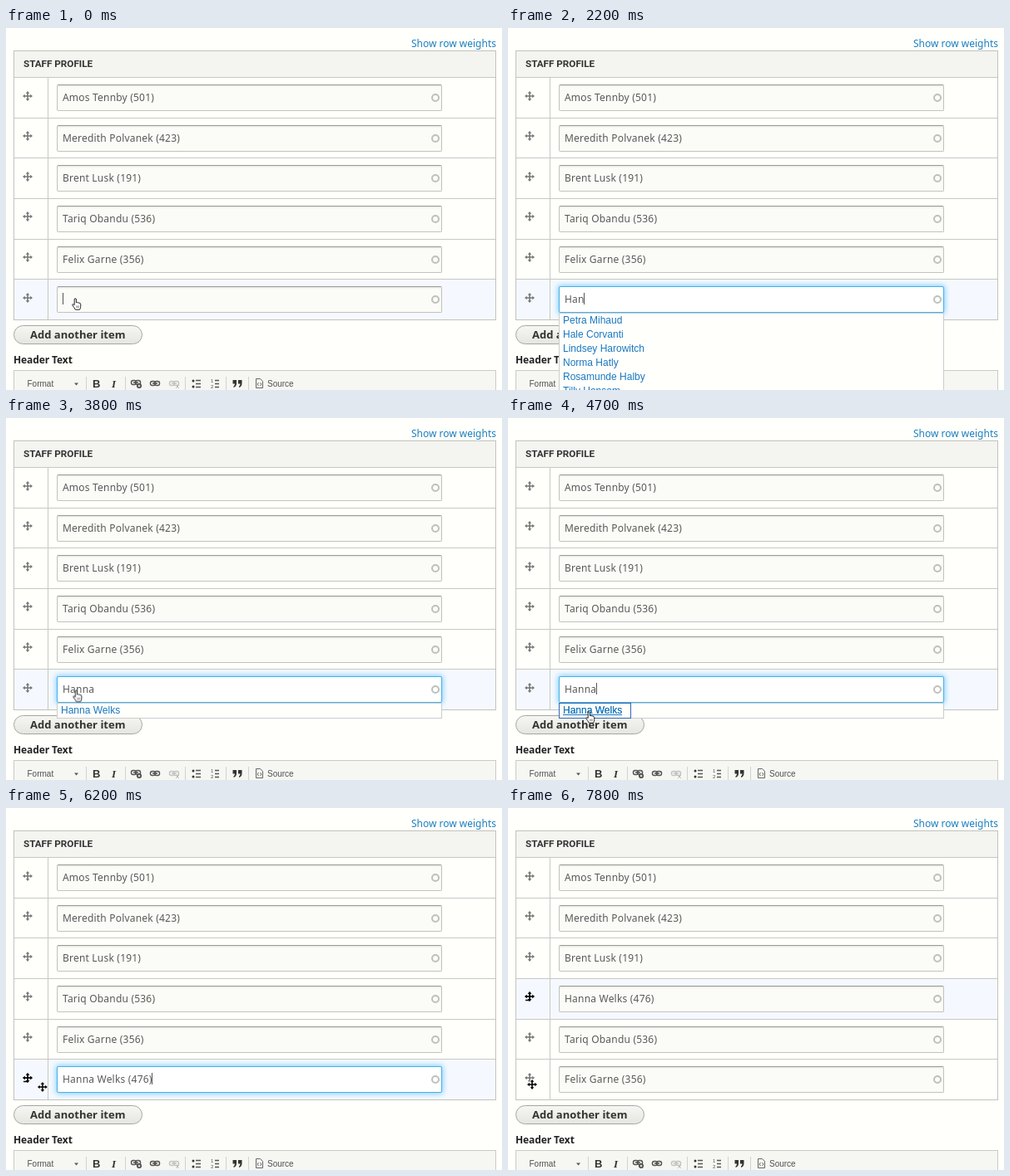
An HTML page that plays this animation: 596 px wide and 436 px high, repeating every 8000 ms.

```html
<!DOCTYPE html>
<html lang="en">
<head>
<meta charset="utf-8">
<title>Staff profile form</title>
<style>
html, body { margin: 0; width: 100%; height: 100%; overflow: hidden; }
body { position: relative; background: #fffffc; font: 12px "Noto Sans", "Open Sans", sans-serif; color: #595959; }
#stage { position: absolute; left: 0; top: 0; width: 596px; height: 436px; overflow: hidden; }
#stage div, #stage svg, #stage ul { position: absolute; box-sizing: border-box; }
#stage div { white-space: pre; }
.link { right: 7px; top: 10px; line-height: 17px; color: #1a7fc0; }

.table { left: 9px; top: 27px; width: 580px; height: 325px; border: 1px solid #c2c2bd; }
.head { left: 9px; top: 27px; width: 580px; height: 32px; padding-left: 11px; border: 1px solid #c2c2bd; border-bottom: 0;
  background: #f4f4f1; font: bold 11.7px/31px Roboto, sans-serif; color: #333; }
.row { left: 10px; top: var(--y); width: 578px; height: 48.65px; border-top: 1px solid #c8c8c3; background: #fffffc; }
.row::before { content: ""; position: absolute; left: 40px; top: 0; bottom: 0; border-left: 1px solid #c8c8c3; }
.row.active { background: #f5f9ff; z-index: 1; }
.grip { left: 9.5px; top: 15.5px; width: 12px; height: 12px; fill: #777; }
.grip.hot { fill: #000; }
.input, .glow { left: 51px; top: 8px; width: 463px; height: 32px; border: 1px solid #c3c3be; border-radius: 2px; }
.input { border-top-color: #9a9a97; background: #fbfbf8; box-shadow: inset 0 1px 2px rgba(0,0,0,.1); }
.glow { border-color: #45b2ec; background: #fff; box-shadow: 0 0 6px 1px #7fcdf8; }
.text { left: 58px; top: 8px; line-height: 32px; letter-spacing: .2px; }
.ring { left: 501px; top: 19px; width: 10px; height: 10px; border: 2px solid #bfbfbc; border-radius: 50%; }
.busy { left: 500px; top: 18px; width: 12px; height: 12px; }
.caret { display: inline-block; width: 1px; height: 14px; margin-left: -.2px; vertical-align: -2px; background: #555; }

.button { left: 9px; top: 358px; width: 155px; height: 23px; border: 1px solid #a5a5a2; border-radius: 12px; padding-left: 19px;
  background: linear-gradient(#f6f6f2, #e6e6e1); font-weight: bold; font-size: 13px; line-height: 21px; color: #333; }
.label { left: 9px; top: 391px; line-height: 17px; font-weight: bold; letter-spacing: -.1px; color: #222; }
.bar { left: 9px; top: 412px; width: 580px; height: 40px; border: 1px solid #cacac6; background: #f6f6f3; }
.bar svg { left: -1px; top: -1px; }
.bar text { font: 10px "Liberation Sans", Arial, sans-serif; fill: #505050; }

.menu { left: 61px; top: 343px; width: 463px; margin: 0; padding: 0 0 0 4px; list-style: none; border: 1px solid #ccc; z-index: 2;
  background: #fffffc; font: 12px/17px "Liberation Sans", Arial, sans-serif; color: #1a78c0; }
.menu.tall { height: 120px; }
.menu.one { height: 19px; }
.pick { left: -1px; top: -1px; width: 87px; height: 19px; padding-left: 5px; border: 1px solid #3566b0; text-decoration: underline; }
.pick { padding-left: 4px; }

.cursor { left: 0; top: 0; z-index: 3; }
.hand { left: -6px; top: -7px; width: 12px; height: 15px; }
.move { left: -6px; top: -6px; width: 12px; height: 12px; }

.row.active, .drop4, .drop3, .glow, .caret, .hot, .under, .busy, .menu, .pick, .hand, .move {
  animation: 8s step-end infinite; }
.row.active { animation-name: lift; }
.drop4 { animation-name: drop4; }
.drop3 { animation-name: drop3; }
.glow { animation-name: glow; animation-timing-function: linear; }
.caret { animation-name: blink; }
.hot { animation-name: hot; }
.under { animation-name: under; }
.busy { animation-name: busy; }
.m1 { animation-name: m1; }
.m2 { animation-name: m2; }
.m3 { animation-name: m3; }
.pick { animation-name: pick; }
.cursor { animation: travel 8s linear infinite; }
.hand { animation-name: hand; }
.move { animation-name: move; }

@keyframes lift { 0% { top: var(--y); } 92.5% { top: calc(var(--y) - 48.65px); } 93.75%, 100% { top: calc(var(--y) - 97.3px); } }
@keyframes drop4 { 0% { top: var(--y); } 92.5%, 100% { top: calc(var(--y) + 48.65px); } }
@keyframes drop3 { 0% { top: var(--y); } 93.75%, 100% { top: calc(var(--y) + 48.65px); } }
@keyframes glow { 0%, 2.4% { opacity: 0; } 6%, 92.49% { opacity: 1; } 92.5%, 100% { opacity: 0; } }
@keyframes blink { 0%, 12.5%, 52.5%, 75%, 87.5% { opacity: 1; } 6.25%, 46.25%, 68.75%, 81.25%, 92.5%, 100% { opacity: 0; } }
@keyframes hot { 0% { opacity: 0; } 77.5%, 100% { opacity: 1; } }
@keyframes under { 0%, 90% { opacity: 0; } 77.5%, 97.5%, 100% { opacity: 1; } }
@keyframes busy { 0%, 25%, 32.5%, 40%, 100% { opacity: 0; } 23.75%, 28.75%, 36.25% { opacity: 1; } }
@keyframes m1 { 0%, 32.5%, 100% { opacity: 0; } 25% { opacity: 1; } }
@keyframes m2 { 0%, 40%, 100% { opacity: 0; } 32.5% { opacity: 1; } }
@keyframes m3 { 0%, 60%, 100% { opacity: 0; } 40% { opacity: 1; } }
@keyframes pick { 0% { opacity: 0; } 51.25%, 100% { opacity: 1; } }
@keyframes hand { 0%, 46.25% { opacity: 1; } 13.1%, 76.25%, 100% { opacity: 0; } }
@keyframes move { 0% { opacity: 0; } 76.25%, 100% { opacity: 1; } }
@keyframes travel {
  0%, 46.25% { transform: translate(85px, 332px); animation-timing-function: ease-in-out; }
  52.5%, 67.5% { transform: translate(99px, 360px); }
  68.75%, 72.5% { transform: translate(100px, 356px); }
  77.5% { transform: translate(44px, 336px); }
  78.75%, 100% { transform: translate(29px, 333px); }
}
</style>
</head>
<body>
<svg width="0" height="0" style="position:absolute">
  <defs>
    <path id="cross" d="M6 0 8.3 2.8H6.8V5.2H9.2V3.7L12 6 9.2 8.3V6.8H6.8V9.2H8.3L6 12 3.7 9.2H5.2V6.8H2.8V8.3L0 6 2.8 3.7V5.2H5.2V2.8H3.7Z"/>
    <g id="chain" fill="none" stroke-width="1.5">
      <rect x="-5.5" y="-2.5" width="6" height="5" rx="2.3"/><rect x="-.5" y="-2.5" width="6" height="5" rx="2.3"/><path d="M-3 0H3"/>
    </g>
  </defs>
</svg>
<div id="stage">
  <div class="link">Show row weights</div>
  <div class="table"></div>
  <div class="head">STAFF PROFILE</div>
  <div id="rows"></div>
  <div class="button">Add another item</div>
  <div class="label">Header Text</div>
  <div class="bar">
    <svg width="580" height="40" viewBox="9 412 580 40">
      <text x="25.5" y="432">Format</text>
      <path d="M82 427.5h5l-2.500 3z" fill="#555"/>
      <path d="M96.500 420v18M143.500 420v18M215.500 420v18M264.500 420v18M291.500 420v18" stroke="#d2d2ce"/>
      <text x="104" y="433" style="font-weight:bold;font-size:13px;fill:#333">B</text>
      <text x="127" y="433" style="font:italic bold 13px 'Liberation Serif',serif;fill:#333">I</text>
      <g stroke="#555">
        <use href="#chain" x="156" y="427"/><use href="#chain" x="179" y="428"/>
        <use href="#chain" x="202" y="428" opacity=".3"/>
      </g>
      <circle cx="160" cy="431" r="3" fill="#444"/><path d="M158.500 431h3M160 429.500v3" stroke="#fff"/>
      <path d="M204 430l4 4m0-4l-4 4" stroke="#bbb"/>
      <path d="M228 424.500h6M228 428.500h6M228 432.500h6M251 424.500h5M251 428.500h5M251 432.500h5" stroke="#555" stroke-width="1.3"/>
      <g fill="#333"><circle cx="225" cy="425" r="1.500"/><circle cx="225" cy="432" r="1.500"/></g>
      <text x="246" y="427" style="font-size:6px">1</text><text x="246" y="434" style="font-size:6px">2</text>
      <path id="quote" d="M272.500 424h4.500v4q0 4-3.500 5v-1.500q1.500-1 1.500-3h-2.500z" fill="#333"/>
      <use href="#quote" x="6.500"/>
      <path d="M300.500 422.500h5l3 3v8h-8zM303.500 427l-1.500 2 1.500 2M305.500 427l1.500 2-1.500 2" fill="none" stroke="#666"/>
      <text x="314" y="432">Source</text>
    </svg>
  </div>
  <ul class="menu tall m1"><li>Petra Mihaud<li>Hale Corvanti<li>Lindsey Harowitch<li>Norma Hatly<li>Rosamunde Halby<li>Tilly Hansom</ul>
  <ul class="menu tall m2"><li>Tilly Hansom<li>Rohan Wetherville<li>Han Bostwick<li>Hanna Welks<li>Seojun Hang<li>Hanivarro Pell</ul>
  <ul class="menu one m3"><li>Hanna Welks<div class="pick">Hanna Welks</div></ul>
  <div class="cursor">
    <svg class="hand" viewBox="0 0 12 15"><path d="M3.200 8.500V2q0-1.300 1.100-1.300T5.400 2v3.700q.9-.8 1.800.2 1-.7 1.700.4 1.600-.5 1.800 1.200v3q0 2-1.200 3.700H4.300Q2.800 11.300.8 8.900q-.3-1.200.8-1.300z" fill="#fff" stroke="#222"/><path d="M6 9.500v2.500M8 9.500v2.500" stroke="#444" stroke-width=".8"/></svg>
    <svg class="move" viewBox="0 0 12 12" overflow="visible"><use href="#cross" stroke="#fff" stroke-width="1.600" paint-order="stroke"/></svg>
  </div>
</div>
<script>
const people = ['Amos Tennby (501)', 'Meredith Polvanek (423)', 'Brent Lusk (191)', 'Tariq Obandu (536)', 'Felix Garne (356)', ''];
const kinds = ['', '', '', 'drop3', 'drop4', 'active'];
const typing = [[0, ''], [1400, 'H'], [1600, 'Ha'], [1800, 'Han'], [2500, 'Hann'], [2700, 'Hanna'], [4800, 'Hanna Welks (476)']];
const LOOP = 8000;

const grip = (kind = '', extra = '') =>
  `<svg class="grip ${kind}" viewBox="0 0 12 12" overflow="visible"><use href="#cross"/>${extra}</svg>`;

const row = (name, i) => {
  const active = kinds[i] === 'active';
  return `<div class="row ${kinds[i]}" style="--y:${(59 + 48.65 * i).toFixed(2)}px">${grip()}` +
    (active ? grip('hot', '<path class="under" d="M1 10.500H6" stroke="#000" stroke-width="1.500"/>') : '') +
    '<div class="input"></div>' + (active ? '<div class="glow"></div>' : '') +
    `<div class="text">${active ? '<span id="typed"></span><span class="caret"></span>' : name}</div><div class="ring"></div>` +
    (active ? '<svg class="busy" viewBox="0 0 12 12"><circle cx="6" cy="6" r="4.200" fill="#fff" stroke="#1677b5" stroke-width="1.800"/><path d="M6 7.500V5l2.500-1.500" fill="none" stroke="#1677b5" stroke-width="1.500"/></svg>' : '') +
    '</div>';
};

document.getElementById('rows').innerHTML = people.map(row).join('');
const typed = document.getElementById('typed');
let start;

function tick(now) {
  start ??= now;
  const t = (now - start) % LOOP;
  const value = typing.findLast(([at]) => at <= t)[1];
  if (typed.textContent !== value) typed.textContent = value;
  requestAnimationFrame(tick);
}
requestAnimationFrame(tick);
</script>
</body>
</html>
```
